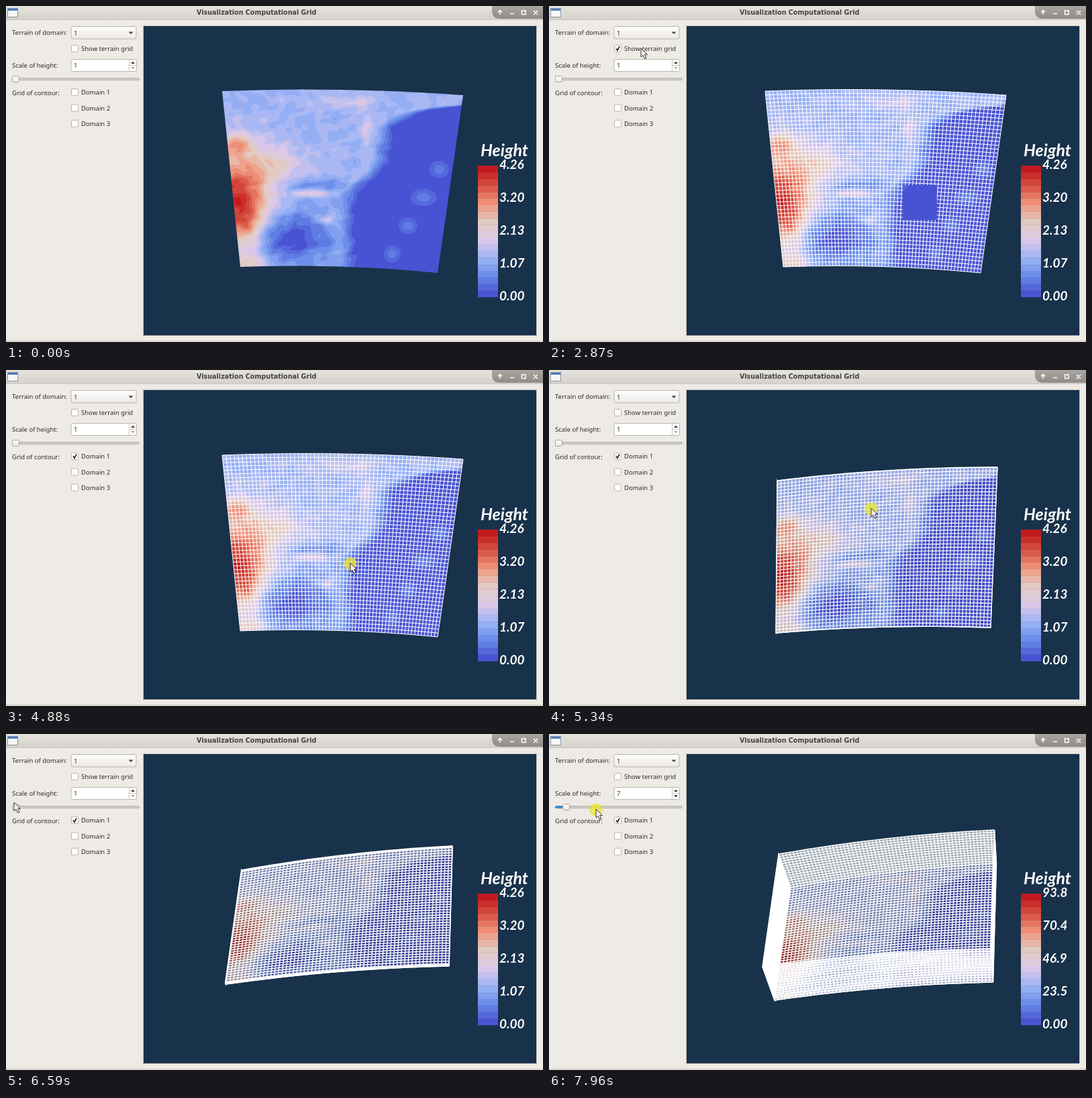
Animation of 800 by 501 pixels, one loop 8 s. Source, as an HTML page with a canvas:

```html
<!DOCTYPE html>
<html lang="en">
<head>
<meta charset="utf-8">
<title>Visualization Computational Grid</title>
<style>
html, body { margin: 0; width: 100%; height: 100%; overflow: hidden; background: #eeeae5; }
svg, canvas { position: absolute; left: 0; top: 0; }
text { font: 9.5px "Noto Sans", sans-serif; fill: #2b2b2b; }
.title { font: bold 9.6px "DejaVu Sans", sans-serif; fill: #444; }
#legend text { font: italic bold 19px Lato, sans-serif; fill: #fff; }
#legend .head { font-size: 25px; }
.field { fill: #fff; stroke: #b8b4ae; }
</style>
</head>
<body>
<svg width="800" height="501">
  <defs>
    <linearGradient id="bar" x2="0" y2="1"><stop stop-color="#e6e3de"/><stop offset="1" stop-color="#d5d1cb"/></linearGradient>
    <linearGradient id="knob" x2="0" y2="1"><stop stop-color="#fff"/><stop offset="1" stop-color="#ebe8e4"/></linearGradient>
    <linearGradient id="tray" x2="0" y2="1"><stop stop-color="#aaa7a2"/><stop offset="1" stop-color="#8f8c88"/></linearGradient>
  </defs>
  <rect width="800" height="20" fill="url(#bar)"/>
  <path d="M0 20.5H800M0 499.5H800" stroke="#c9c5bf"/>
  <rect x="2.5" y="3.5" width="15" height="13" fill="#f6f6f6" stroke="#8b97a8"/>
  <rect x="3" y="4" width="14" height="3" fill="#4c7fc0"/>
  <text class="title" x="284" y="13">Visualization Computational Grid</text>
  <path d="M724 0H800V19H736Q724 19 724 7Z" fill="url(#tray)"/>
  <path d="M736 13V8M733 9.5L736 6.5L739 9.5M751 11.5H757M768.5 7H774V12.5H768.5ZM786 7L792 13M792 7L786 13"
    fill="none" stroke="#fff" stroke-width="1.5"/>

  <text x="9" y="43">Terrain of domain:</text>
  <rect class="field" x="97" y="30.5" width="97" height="18.5" rx="2" style="fill:url(#knob)"/>
  <text x="101" y="43.5">1</text>
  <path d="M182.5 38.5H189.5L186 42Z" fill="#444"/>
  <text x="9" y="92">Scale of height:</text>
  <rect class="field" x="97" y="79.5" width="97.5" height="18" rx="2"/>
  <path d="M183.5 80V97M184 88.5H194" stroke="#ccc8c2"/>
  <path d="M186 86H192L189 82.5Z" fill="#444"/>
  <path id="down" d="M186 91H192L189 94.5Z"/>
  <text id="scale" x="101" y="92">1</text>
  <rect x="9.5" y="107.5" width="189" height="3" rx="1.5" fill="#d2cec9" stroke="#b4b0aa"/>
  <rect id="done" x="9.5" y="107.5" height="3" rx="1.5" fill="#3f97d8" stroke="#3583bd"/>
  <rect id="handle" y="104.5" width="10" height="9" rx="2" fill="url(#knob)" stroke="#a5a19b"/>
  <text x="9" y="132.5">Grid of contour:</text>
  <g id="boxes"></g>

  <rect x="204.5" y="29.5" width="586" height="462" fill="#19324b" stroke="#c5c1bb"/>
  <g id="legend"><text class="head" x="707" y="224">Height</text></g>
</svg>
<canvas id="scene" width="800" height="501"></canvas>
<svg width="800" height="501">
  <g id="cursor">
    <circle id="press" cy="1" r="9.5" fill="#ece52a" opacity=".75"/>
    <path d="M0 0V13L3 10.3L5.5 15.5L8 14.4L5.6 9.4H9.5Z" fill="#f4f4f4" stroke="#333"/>
  </g>
</svg>
<script>
const $ = id => document.getElementById(id);
const LOOP = 8000, TICK = 77.3, BANDS = 20, COLS = 60, ROWS = 46;
const MAX_HEIGHT = 4.264, MAX_SCALE = 22, BOW = -5;
const ctx = $('scene').getContext('2d');
const lerp = (a, b, f) => a + (b - a) * f;
const clamp = (x, lo, hi) => Math.min(hi, Math.max(lo, x));
const progress = (t, start, end) => clamp((t - start) / (end - start), 0, 1);
const random = n => Math.abs(Math.sin(n * 127.1) * 43758.5) % 1;
const range = n => Array.from({ length: n }, (_, i) => i);

// ---- height map ----
const STOPS = ['4853d4', '688be9', '9cb4f6', 'dcc8e8', 'e2cdc4', 'f09880', 'da5442', 'c21a1e']
  .map(hex => [0, 2, 4].map(i => parseInt(hex.slice(i, i + 2), 16)));
const palette = range(BANDS).map(i => {
  const at = i / (BANDS - 1) * (STOPS.length - 1), k = Math.min(Math.floor(at), STOPS.length - 2);
  return STOPS[k].map((c, j) => Math.round(lerp(c, STOPS[k + 1][j], at - k)));
});

const bump = (x, y, cx, cy, rx, ry) => Math.exp(-(((x - cx) / rx) ** 2) - ((y - cy) / ry) ** 2);
const mountain = (x, y) => .6 * bump(x, y, 345, 284, 48, 62) + .3 * bump(x, y, 343, 207, 24, 16)
  + .2 * bump(x, y, 358, 330, 22, 30) + .2 * bump(x, y, 400, 235, 40, 24) + .22 * bump(x, y, 360, 382, 24, 16);
const lowland = (x, y) => .24 * bump(x, y, 420, 345, 52, 33) + .12 * bump(x, y, 470, 268, 55, 9)
  + .09 * bump(x, y, 460, 340, 75, 50);
const ridges = (x, y) => .2 * bump(x, y, 455, 279, 28, 6) + .25 * bump(x, y, 490, 318, 26, 7)
  + .13 * bump(x, y, 520, 142, 36, 8) + .12 * bump(x, y, 536, 183, 9, 22);
const islands = range(4).map(i => [lerp(645, 575, i / 3), lerp(243, 369, i / 3), 12 + 10 * random(i + 1), 13]);
const coastAt = y => 522 + 55 / (1 + Math.exp((y - 258) / 9)) + 110 * Math.exp((148 - y) / 12);

function height(x, y) {
  const noise = Math.sin(x * .09 + 2 * Math.sin(y * .07)) * Math.sin(y * .13 + 1.7 * Math.sin(x * .06))
    + .6 * Math.sin(x * .21 + y * .17 + 2 * Math.sin(y * .12)) * Math.sin(y * .2 - x * .11);
  const land = .305 + noise * .038 + mountain(x, y) - lowland(x, y) + ridges(x, y);
  const shore = Math.max(0, (coastAt(y) - x + noise * 4) * .0095);
  return Math.min(land, shore) + islands.reduce((h, island) => h + .13 * bump(x, y, ...island), 0);
}

const TEX = { x: 314, y: 114, w: 376, h: 292 };
const terrain = document.createElement('canvas');
terrain.width = TEX.w;
terrain.height = TEX.h;
{
  const tc = terrain.getContext('2d'), image = tc.createImageData(TEX.w, TEX.h);
  for (let p = 0; p < TEX.w * TEX.h; p++) {
    const h = height(TEX.x + p % TEX.w, TEX.y + Math.floor(p / TEX.w));
    image.data.set([...palette[clamp(Math.floor(h * BANDS), 0, BANDS - 1)], 255], p * 4);
  }
  tc.putImageData(image, 0, 0);
}

// ---- camera: corners run clockwise from the top left ----
const POSES = [
  { time: 4880, tilt: 0, corners: [[322, 127], [681, 133], [643, 398], [349, 389]] },
  { time: 5334, tilt: .25, corners: [[340, 165], [668, 145], [658, 384], [338, 392]] },
  { time: 5720, tilt: 1, corners: [[351, 204], [665, 168], [660, 345], [327, 372]] }
];

function poseAt(t) {
  const a = POSES[t < POSES[1].time ? 0 : 1], b = POSES[POSES.indexOf(a) + 1];
  const f = progress(t, a.time, b.time);
  return {
    tilt: lerp(a.tilt, b.tilt, f),
    corners: a.corners.map((c, i) => c.map((v, k) => lerp(v, b.corners[i][k], f)))
  };
}

// Maps (u, v) and a layer from -1 to 1 to the stage.
function projector({ corners: [tl, tr, br, bl], tilt }, scale) {
  const lift = tilt * scale / MAX_SCALE;
  return (u, v, layer = 1) => {
    const [x, y] = [0, 1].map(k => lerp(lerp(tl[k], tr[k], u), lerp(bl[k], br[k], u), v));
    return [x + lerp(9, 1.5, u) * layer * lift, y + 25 * layer * lift + 4 * BOW * u * (1 - u)];
  };
}
const flat = projector(POSES[0], 1);

function fill(points, color) {
  ctx.beginPath();
  points.forEach(p => ctx.lineTo(...p));
  ctx.closePath();
  ctx.fillStyle = color;
  ctx.fill();
}
const outline = at => [...range(21).map(i => at(i / 20, 0)), ...range(21).map(i => at(1 - i / 20, 1))];

// Draws the map cell by cell, each with its own affine transform.
function drawTerrain(at, shade) {
  const nu = 12, nv = 9;
  for (let n = 0; n < nu * nv; n++) {
    const u = n % nu / nu, v = Math.floor(n / nu) / nv;
    const u1 = Math.min(1, u + 1 / nu + .004), v1 = Math.min(1, v + 1 / nv + .006);
    const frame = map => {
      const [o, p, q] = [map(u, v), map(u1, v), map(u, v1)];
      return new DOMMatrix([p[0] - o[0], p[1] - o[1], q[0] - o[0], q[1] - o[1], ...o]);
    };
    const cell = new Path2D();
    [at(u, v), at(u1, v), at(u1, v1), at(u, v1)].forEach(p => cell.lineTo(...p));
    ctx.save();
    ctx.clip(cell);
    ctx.setTransform(frame(at).multiply(frame(flat).inverse()));
    ctx.drawImage(terrain, TEX.x, TEX.y);
    ctx.restore();
  }
  fill(outline(at), `rgba(5,8,25,${shade})`);
}

function lattice(at, rows) {
  ctx.beginPath();
  for (let j = 0; j <= rows; j++)
    for (let i = 0; i <= 16; i++) ctx[i ? 'lineTo' : 'moveTo'](...at(i / 16, j / rows));
  for (let i = 0; i <= COLS; i++) {
    ctx.moveTo(...at(i / COLS, 0));
    ctx.lineTo(...at(i / COLS, 1));
  }
  ctx.stroke();
}

function drawGrid(at, holes, tilt) {
  ctx.save();
  ctx.beginPath();
  ctx.rect(205, 30, 585, 461);
  for (let i = 0; i < holes; i++) ctx.rect(527 + 51 * i, 267 + 52 * i, 51, 52);
  ctx.clip('evenodd');
  ctx.strokeStyle = '#fff';
  ctx.lineWidth = 1 + .4 * tilt;
  lattice(at, ROWS);
  if (tilt) {
    for (const side of [0, 1]) {
      const wall = (u, w) => at(u, side, 2 * w - 1);
      fill(outline(wall), 'rgba(255,255,255,.55)');
      lattice(wall, 14);
      fill([at(side, 0, -1), at(side, 0, 1), at(side, 1, 1), at(side, 1, -1)], '#fff');
      ctx.stroke();
    }
  }
  ctx.restore();
}

// ---- controls ----
$('boxes').innerHTML = ['Show terrain grid', 'Domain 1', 'Domain 2', 'Domain 3'].map((label, i) =>
  `<g transform="translate(102.5 ${i ? 105.3 + 23.3 * i : 63.5})">
  <rect class="field" x="-5" y="-5" width="10" height="10" rx="1"/>
  <path id="tick${i}" d="M-2.5 0L-.5 2.7L2.5-3" fill="none" stroke="#222" stroke-width="1.7" visibility="hidden"/>
  <text x="9.5" y="3.7">${label}</text></g>`).join('');

const barStep = 196 / BANDS;
$('legend').innerHTML += palette.map((c, i) =>
  `<rect x="703" y="${434 - (i + 1) * barStep}" width="30" height="${barStep + .3}" fill="rgb(${c})"/>`).join('')
  + range(5).map(i => `<text id="mark${i}" x="735" y="${438.5 - i * 49}"></text>`).join('');

const show = (id, on) => $(id).setAttribute('visibility', on ? 'visible' : 'hidden');

// Pointer moves: start, end, x, y.
const MOVES = [
  [150, 850, 137, 82], [1080, 1470, 137, 63], [2940, 3100, 136, 157], [3260, 3410, 133, 131],
  [4020, 4730, 513, 288], [4880, 5334, 480, 206], [5334, 5660, 322, 198], [6210, 6540, 12, 102], [7050, 7960, 70, 112]
];
const PRESSES = [[1860, 2010], [2720, 2870], [3560, 3730], [4880, 5700], [7050, LOOP]];

const pointerAt = t => MOVES.reduce(([px, py], [start, end, x, y]) => {
  const f = progress(t, start, end), eased = f * f * (3 - 2 * f);
  return [lerp(px, x, eased), lerp(py, y, eased)];
}, [477, 332]);

function render(t) {
  const step = Math.floor((t + 6) / TICK) * TICK;
  const scale = Math.round(lerp(1, MAX_SCALE, progress(step, 7130, 7960)));
  const value = Math.min(7, scale);
  const terrainGrid = t >= 2260 && t < 3010, contour = t >= 3870;

  const pose = poseAt(step), at = projector(pose, scale);
  ctx.clearRect(0, 0, 800, 501);
  drawTerrain(at, .35 * pose.tilt);
  if (terrainGrid || contour) drawGrid(at, t >= 4880 ? 0 : contour ? 2 : 1, pose.tilt);

  show('tick0', terrainGrid);
  show('tick1', contour);
  $('scale').textContent = value;
  $('down').setAttribute('fill', value > 1 ? '#444' : '#b5b1ab');
  const travel = (value - 1) * 1.85;
  $('handle').setAttribute('x', 9.5 + travel);
  $('done').setAttribute('width', travel);
  range(5).forEach(i => {
    const mark = MAX_HEIGHT * scale * i / 4;
    $('mark' + i).textContent = mark.toFixed(mark < 10 ? 2 : 1);
  });

  $('cursor').setAttribute('transform', `translate(${pointerAt(step)})`);
  show('cursor', t >= 150);
  show('press', t >= 150 && PRESSES.some(([a, b]) => t >= a && t < b));
}

function frame() {
  render(performance.now() % LOOP);
  requestAnimationFrame(frame);
}
frame();
</script>
</body>
</html>
```
